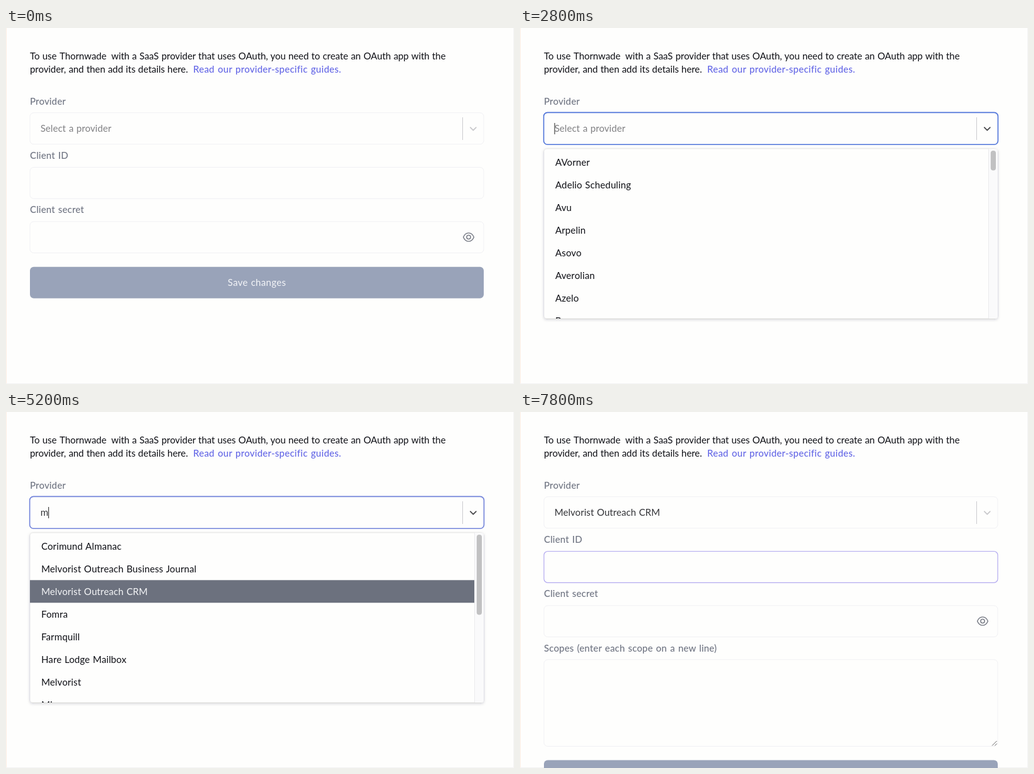
These frames come from a looping animation (806 by 566 pixels, 8000 ms). An HTML page:

```html
<!DOCTYPE html>
<html lang="en">
<head>
<meta charset="utf-8">
<title>Provider form</title>
<style>
  html, body { margin: 0; width: 100%; height: 100%; overflow: hidden; background: #fefefd; }
  svg { display: block; width: 806px; height: 566px; }
  text { font: 15px Lato, "Open Sans", sans-serif; letter-spacing: .06px; word-spacing: .7px; fill: #0f1016; white-space: pre; }
  .lead { letter-spacing: -.07px; word-spacing: .5px; }
  .label { font-weight: 500; letter-spacing: .14px; word-spacing: 1.2px; fill: #707583; }
  .link { font-weight: 500; letter-spacing: .24px; word-spacing: 1.2px; fill: #6467e6; }
  .hint { fill: #808083; }
  .value { fill: #333438; }
  .save { fill: #f4f5f8; letter-spacing: .3px; text-anchor: middle; }
  .field { fill: none; stroke: #f1f1f4; }
  .button { fill: #99a3b9; }
  .list text { letter-spacing: .12px; }
</style>
</head>
<body>
<svg id="stage" viewBox="0 0 806 566">
  <defs>
    <clipPath id="menuClip"><rect x="38" y="192" width="720" height="270" rx="4"/></clipPath>
    <filter id="shadow" x="-5%" y="-5%" width="110%" height="115%">
      <feDropShadow dx="0" dy="1.5" stdDeviation="2" flood-color="#1c1c38" flood-opacity=".2"/>
    </filter>
  </defs>
  <rect width="806" height="566" fill="#fefefd"/>
  <path d="M.5 0V566" stroke="#fdeee3"/>
  <path d="M805.5 0V565.5H0" fill="none" stroke="#f3f2f3"/>

  <text class="lead" y="49.5"><tspan x="38">To use</tspan><tspan x="85">Thornwade</tspan><tspan x="167">with a SaaS provider that uses OAuth, you need to create an OAuth app with the</tspan></text>
  <text class="lead" x="38" y="71">provider, and then add its details here.</text>
  <text class="link" x="297" y="71">Read our provider-specific guides.</text>

  <text class="label" x="38" y="121.5">Provider</text>
  <rect id="select" class="field" rx="6"/>
  <text id="entry" x="54.7" y="164.8"></text>
  <path id="caret" d="M0 151V169" stroke="#333" stroke-width="1.1"/>
  <path d="M724.5 142V178" stroke="#cccccf"/>
  <path id="chevron" d="M736.8 158.2L741.3 162.6L745.8 158.2" fill="none" stroke-width="1.8" stroke-linecap="round" stroke-linejoin="round"/>

  <g id="form">
    <text class="label" x="38" y="207.6">Client ID</text>
    <rect id="client" class="field" x="38" y="221.5" width="720" height="49.8" rx="6"/>
    <text class="label" x="38" y="294">Client secret</text>
    <rect class="field" x="38" y="307.8" width="720" height="49.8" rx="6"/>
    <g fill="none" stroke="#6d717c" stroke-width="1.3">
      <path d="M725.6 332.5Q728.4 325.8 734 325.8T742.4 332.5Q739.6 339.2 734 339.2T725.6 332.5Z"/>
      <circle cx="734" cy="332.5" r="3.1"/>
    </g>
    <g id="scopes">
      <text class="label" x="38" y="380.5">Scopes (enter each scope on a new line)</text>
      <rect class="field" x="38" y="393.8" width="720" height="137.7" rx="6"/>
      <path d="M749 530.5L756.5 523M753.3 530.5L756.5 527.3" stroke="#686868"/>
    </g>
    <g id="save">
      <rect class="button" x="38" y="379.7" width="720" height="50" rx="6"/>
      <text class="save" x="398" y="410">Save changes</text>
    </g>
  </g>

  <g id="menu">
    <rect x="38" y="192" width="720" height="270" rx="4" fill="#fefefd" stroke="#000" stroke-opacity=".07" filter="url(#shadow)"/>
    <g clip-path="url(#menuClip)">
      <rect x="743" y="192" width="15" height="270" fill="#fafafb"/>
      <path d="M743.5 192V462" stroke="#ebebed"/>
      <rect id="thumb" x="746.8" y="195" width="8.2" rx="4.1" fill="#c1c1c2"/>
      <rect id="mark" x="38" y="267.3" width="705" height="36" fill="#6c717e"/>
      <g id="all" class="list"></g>
      <g id="found" class="list"></g>
    </g>
  </g>
</svg>
<script>
const LOOP = 8000;
const T = { hover: 1400, open: 1600, focused: 2000, typed: 4600, mark: 5000, caretBack: 5200,
            picked: 5400, clientHover: 7400, blur: 7600, settled: 7800 };
const BLINK = 600;
const ROW = 36;
const PICK = 2;

const allNames = ["AVorner", "Adelio Scheduling", "Avu", "Arpelin", "Asovo", "Averolian", "Azelo", "Bassenor"];
const foundNames = ["Corimund Almanac", "Melvorist Outreach Business Journal", "Melvorist Outreach CRM",
                    "Fomra", "Farmquill", "Hare Lodge Mailbox", "Melvorist", "Misevano"];

const el = id => document.getElementById(id);
const show = (id, on) => el(id).setAttribute("display", on ? "inline" : "none");
const set = (id, attrs) => { for (const k in attrs) el(id).setAttribute(k, attrs[k]); };
const border = (id, color, width) => { el(id).style.stroke = color; el(id).style.strokeWidth = width; };

function fillList(id, names) {
  names.forEach((name, i) => {
    const row = document.createElementNS("http://www.w3.org/2000/svg", "text");
    row.setAttribute("x", 56);
    row.setAttribute("y", 218.7 + i * ROW);
    row.textContent = name;
    el(id).append(row);
  });
}

function selectBorder(t) {
  if (t < T.hover || t >= T.blur) return ["#f1f1f4", 1];
  if (t < T.open) return ["#b3aaf0", 1.2];
  if (t < T.focused) return ["#7f87e4", 1.4];
  return [t < T.mark ? "#4f74d9" : "#7283da", 1.6];
}

function chevronColor(t) {
  if (t < T.open || t >= T.settled) return "#c9c9cc";
  if (t < T.focused || t >= T.blur) return "#858588";
  return "#4a4a4d";
}

function caretOn(t) {
  if (t < T.open || t >= T.picked) return false;
  if (t >= T.typed) return t >= T.caretBack;
  return Math.floor((t - T.open) / BLINK) % 2 === 0;
}

function draw(t) {
  const typed = t >= T.typed;
  const picked = t >= T.picked;
  const open = t >= T.open && !picked;
  const marked = t >= T.mark && open;

  // The focus ring grows outwards from the field's edge.
  const ring = t >= T.open && t < T.blur ? 0.4 : 0;
  set("select", { x: 38 - ring, y: 134.8 - ring, width: 720 + 2 * ring, height: 50 + 2 * ring });
  border("select", ...selectBorder(t));
  set("chevron", { stroke: chevronColor(t) });
  el("entry").textContent = picked ? foundNames[PICK] : typed ? "m" : "Select a provider";
  set("entry", { class: typed ? "value" : "hint" });
  show("caret", caretOn(t));
  set("caret", { transform: `translate(${typed ? 67.6 : 55})` });

  show("form", !open);
  show("scopes", picked);
  set("save", { transform: `translate(0 ${picked ? 173.8 : 0})` });
  if (t >= T.clientHover) border("client", "#b3aaf0", 1.2);
  else border("client", "#f1f1f4", 1);

  show("menu", open);
  show("all", !typed);
  show("found", typed);
  show("mark", marked);
  set("thumb", { height: typed ? 127.5 : 31.5 });
  el("found").children[PICK].style.fill = marked ? "#f4f5f7" : "";
}

fillList("all", allNames);
fillList("found", foundNames);

const start = performance.now();
function frame() {
  draw((performance.now() - start) % LOOP);
  requestAnimationFrame(frame);
}
frame();
</script>
</body>
</html>
```
